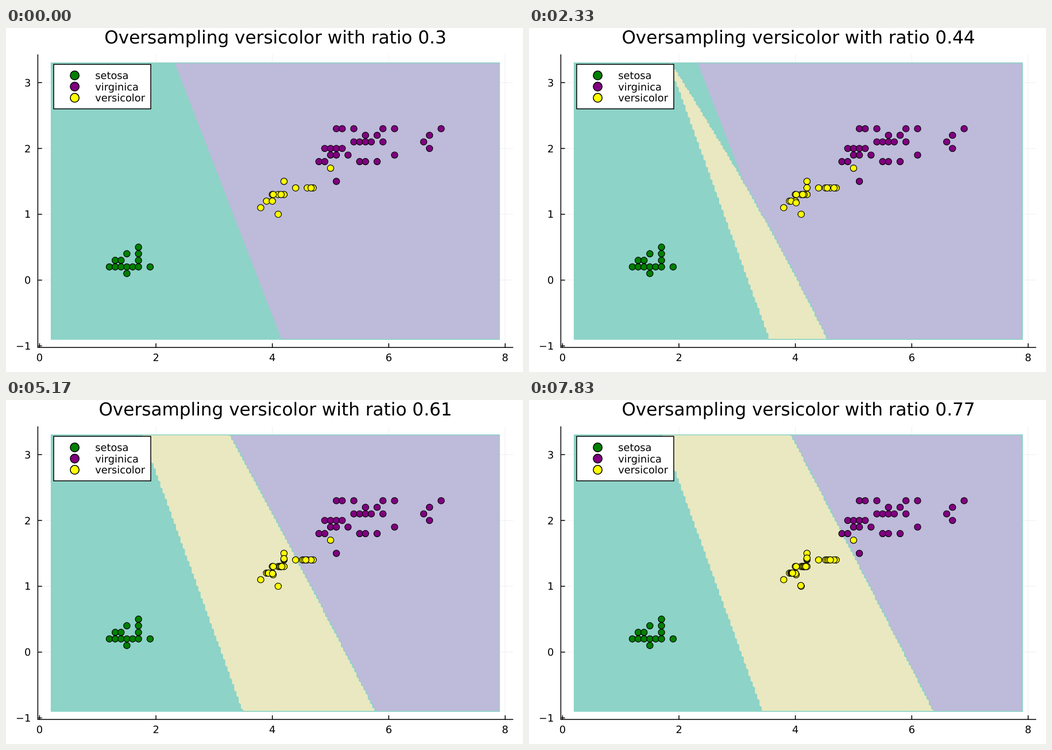
An HTML page that plays this animation: 900 px wide and 600 px high, repeating every 8000 ms.

```html
<!DOCTYPE html>
<html lang="en">
<head>
<meta charset="utf-8">
<title>Oversampling ratio</title>
<style>
  html, body { margin: 0; width: 100%; height: 100%; overflow: hidden; background: #fff; }
  svg { display: block; width: 900px; height: 600px; }
  text { font: 17.78px "DejaVu Sans", sans-serif; text-rendering: geometricPrecision; }
  #title { font-size: 31.11px; }
</style>
</head>
<body>
<svg id="stage" viewBox="0 0 900 600"></svg>
<script>
const TEAL = '#8dd3c7', CREAM = '#e9e8c0', LILAC = '#bebada';
const LOOP = 8000, STEPS = 48;
const starts = Array.from({ length: STEPS }, (_, k) => Math.round(k * 100 / 6) * 10);

const mix = (a, b, f) => a + (b - a) * f;
const px = x => 58.4 + 101.32 * x;
const py = y => 439.7 - 114.8 * y;
const box = { left: px(0.2), right: px(7.9), top: py(3.3), bottom: py(-0.9) };

const stage = document.getElementById('stage');
function add(tag, attrs, text) {
  const el = document.createElementNS('http://www.w3.org/2000/svg', tag);
  for (const name in attrs) el.setAttribute(name, attrs[name]);
  if (text !== undefined) el.textContent = text;
  return stage.appendChild(el);
}
const line = (d, color, width) => add('path', { d, stroke: color, 'stroke-width': width, fill: 'none' });
const dot = (cx, cy, r, fill, width) => add('circle', { cx, cy, r, fill, stroke: '#000', 'stroke-width': width });
const point = (x, y, fill) => dot(px(x), py(y), 5.6, fill, 1.2);

// Grid and decision regions
for (let x = 0; x <= 8; x += 2) line(`M${px(x)} 46V557`, '#efefef', 1);
for (let y = -1; y <= 3; y++) line(`M55 ${py(y)}H883`, '#efefef', 1);
add('rect', {
  x: box.left, y: box.top, width: box.right - box.left, height: box.bottom - box.top,
  fill: TEAL, stroke: TEAL, 'stroke-width': 1.5
});
const region = fill => add('path', { fill, stroke: TEAL, 'stroke-width': 1.4 });
const creamRegion = region(CREAM), lilacRegion = region(LILAC);

// Axes
line('M55.4 46V557.3H883', '#000', 1.5);
for (let x = 0; x <= 8; x += 2) {
  line(`M${px(x)} 557V550`, '#000', 1.5);
  add('text', { x: px(x), y: 581, 'text-anchor': 'middle' }, x);
}
for (let y = -1; y <= 3; y++) {
  line(`M55.4 ${py(y)}H62.7`, '#000', 1.5);
  add('text', { x: 43.3, y: py(y) + 6.5, 'text-anchor': 'end' }, String(y).replace('-', '\u2212'));
}
const title = add('text', { id: 'title', x: 469, y: 27, 'text-anchor': 'middle' });

// Measurements fall on a lattice, so each species is a few evenly spaced runs
const runs = fill => (x, y, count = 1, dx = 0.1, dy = 0) => {
  for (let i = 0; i < count; i++) point(x + i * dx, y + i * dy, fill);
};

const setosa = runs('green');
setosa(1.2, 0.2, 6);
setosa(1.3, 0.3, 2);
setosa(1.7, 0.3, 3, 0, 0.1);
setosa(1.5, 0.1, 2, 0, 0.3);
setosa(1.9, 0.2);

const virginica = runs('purple');
virginica(4.8, 1.8, 2);
virginica(4.9, 2, 4);
virginica(5, 1.9, 2, 0.3);
virginica(5.1, 1.5, 3, 0, 0.4);
virginica(5.2, 2.3, 2, 0.2);
virginica(5.4, 2.1, 4);
virginica(5.5, 1.8);
virginica(5.6, 1.8, 2, 0, 0.4);
virginica(5.8, 1.8, 2, 0, 0.4);
virginica(5.9, 2.1, 2, 0, 0.2);
virginica(6.1, 1.9, 2, 0, 0.4);
virginica(6.6, 2.1, 2, 0.3, 0.2);
virginica(6.7, 2, 2, 0, 0.2);

const versicolor = runs('yellow');
versicolor(3.8, 1.1, 2, 0.1, 0.1);
versicolor(4, 1.2, 2, 0.1, -0.2);
versicolor(4, 1.3, 3);
versicolor(4.015, 1.3, 2, 0.135);
versicolor(4.4, 1.4, 2, 0.2);
versicolor(4.7, 1.4, 2, -0.035);
versicolor(4.2, 1.5);
versicolor(5, 1.7);

// Oversampling places new points between neighbouring ones
const links = [
  [4.4, 1.4, 4.7, 1.4], [4.2, 1.4, 4.2, 1.5], [4, 1.3, 4.2, 1.3],
  [3.9, 1.2, 4, 1.2], [4.1, 1, 4, 1.2]
];
const synthetic = Array.from({ length: 19 }, (_, i) => {
  const [x0, y0, x1, y1] = links[i % links.length];
  const f = (0.4 + i * 0.618) % 1;
  return { from: 2 + 2.4 * i, el: point(mix(x0, x1, f), mix(y0, y1, f), 'yellow') };
});

// Legend
add('rect', { x: 83, y: 63.4, width: 169, height: 77.6, fill: '#fff', stroke: '#000', 'stroke-width': 1.5 });
[['setosa', 'green'], ['virginica', 'purple'], ['versicolor', 'yellow']].forEach(([name, fill], i) => {
  const y = 82.8 + i * 19.5;
  dot(119.6, y, 7.7, fill, 1.5);
  add('text', { x: 155.3, y: y + 6.5 }, name);
});

// Pairwise boundaries: x at height f (0 top, 1 bottom) for step k
const tealLilac = f => mix(293, 479, f);
const tealCream = (f, k) => 248 - 0.37 * k + 175 * f;

// Foot of the cream and lilac boundary: it slows down near the end
const footKeys = [[0, 400], [24, 606], [41, 697], [47, 705]];
function footAt(k) {
  const i = Math.max(1, footKeys.findIndex(([step]) => step >= k));
  const [[k0, x0], [k1, x1]] = footKeys.slice(i - 1, i + 1);
  return mix(x0, x1, (k - k0) / (k1 - k0));
}
function creamLilac(f, k) {
  const bend = 24 * Math.exp(-k / 14);
  return footAt(k) - (246 + 3 * bend) * (1 - f) + 4 * bend * f * (1 - f);
}

// The classifier is sampled on a grid, which leaves stairs along the edges
const CELLS = 200, cell = (box.right - box.left) / CELLS;
const snap = x => box.left + (Math.floor((x - box.left) / cell) + 0.5) * cell;

function areaPath(rows) {
  const left = rows.map(([y, a]) => `${a.toFixed(1)} ${y.toFixed(1)}`);
  const right = rows.map(([y, , b]) => `${b.toFixed(1)} ${y.toFixed(1)}`).reverse();
  return rows.length ? `M${left.concat(right).join('L')}Z` : '';
}

function drawRegions(k) {
  const cream = [], lilac = [];
  for (let j = 0; j <= CELLS; j++) {
    const f = j / CELLS, y = mix(box.top, box.bottom, f);
    const start = snap(tealCream(f, k)), end = snap(creamLilac(f, k));
    if (end > start) cream.push([y, start, end]);
    lilac.push([y, Math.max(tealLilac(f), end), box.right]);
  }
  creamRegion.setAttribute('d', areaPath(cream));
  lilacRegion.setAttribute('d', areaPath(lilac));
}

let shown = -1;
function render(time) {
  const t = time % LOOP;
  const k = starts.filter(s => s <= t).length - 1;
  if (k === shown) return;
  shown = k;
  title.textContent = `Oversampling versicolor with ratio ${(30 + k) / 100}`;
  synthetic.forEach(p => p.el.setAttribute('visibility', k >= p.from ? 'visible' : 'hidden'));
  drawRegions(k);
}

const begin = performance.now();
function tick() {
  render(performance.now() - begin);
  requestAnimationFrame(tick);
}
render(0);
requestAnimationFrame(tick);
</script>
</body>
</html>
```
